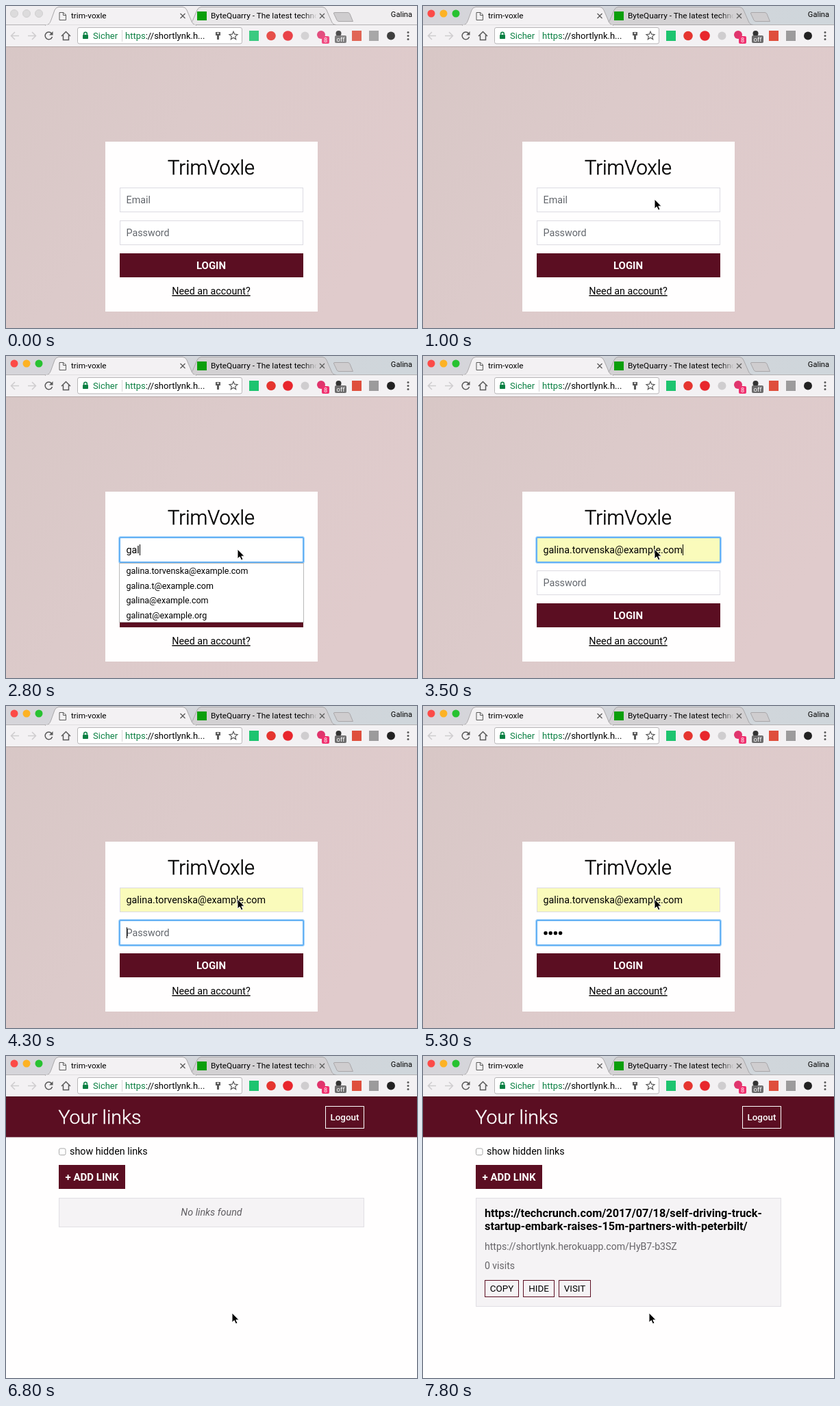
Animation, 600 px wide and 470 px high, one loop 8 s. Source, as an HTML page:

```html
<!DOCTYPE html>
<html lang="en">
<head>
<meta charset="utf-8">
<title>Login demo</title>
<style>
html, body { margin: 0; width: 100%; height: 100%; overflow: hidden; background: #fff; }
svg { display: block; width: 600px; height: 470px; font-family: Roboto, "Open Sans", sans-serif; font-size: 14.3px; fill: #000; }
.hide { display: none; }
.line { fill: none; stroke: #5a5a5a; stroke-width: 1.5; }
.tab { font-size: 11.8px; }
.url { font-size: 13px; }
.big { font-size: 28.4px; font-weight: 300; stroke-width: .45; }
.btn { font-size: 15px; font-weight: 700; fill: #fff; }
.small { font-size: 13.4px; }
.box { fill: #fff; stroke: #dcdbe2; }
.wine { fill: #5b0e22; }
.hint { fill: #62666c; }
.ring rect { fill: none; stroke: #66b2f4; stroke-width: 2; }
.ring rect:first-child { stroke: #a9d5fb; stroke-width: 3; }
.strip { fill: url(#bar); }
.back { fill: #d3d1d3; }
.fade { stop-color: #d3d1d3; }
.idle .strip { fill: #f0eef0; }
.idle .back { fill: #e9e7e9; }
.idle .fade { stop-color: #e9e7e9; }
.idle .light { fill: #dcdbdc; stroke: #d0cfd0; }
.idle .ext { opacity: .86; }
</style>
</head>
<body>
<svg id="stage" viewBox="0 0 600 470" xmlns="http://www.w3.org/2000/svg">
  <defs>
    <linearGradient id="wall" x1="0" y1="0" x2="1" y2="0.5">
      <stop offset="0" stop-color="#d8c7c6"/>
      <stop offset=".45" stop-color="#dccaca"/>
      <stop offset="1" stop-color="#e0cbcc"/>
    </linearGradient>
    <linearGradient id="bar">
      <stop offset="0" stop-color="#d6d5da"/>
      <stop offset="1" stop-color="#cfd6db"/>
    </linearGradient>
    <linearGradient id="fade">
      <stop class="fade" offset="0" stop-opacity="0"/>
      <stop class="fade" offset="1"/>
    </linearGradient>
    <clipPath id="tabClip"><rect x="296" y="4" width="157" height="22"/></clipPath>
  </defs>

  <!-- login page -->
  <g id="login">
    <rect y="59" width="600" height="411" fill="url(#wall)"/>
    <rect x="145" y="198" width="310" height="248" fill="#fffefe"/>
    <text class="big" x="299.5" y="246" text-anchor="middle" stroke="#000" style="font-size:29px">TrimVoxle</text>
    <rect id="mailBox" class="box" x="166.5" y="265.5" width="267" height="35"/>
    <text id="mail" x="175.5" y="288"></text>
    <rect class="box" x="166.5" y="313.5" width="267" height="35"/>
    <text id="passHint" class="hint" x="175.5" y="336">Password</text>
    <g id="dots"></g>
    <rect class="wine" x="166" y="361" width="268" height="35"/>
    <text class="btn" x="299.5" y="384" text-anchor="middle">LOGIN</text>
    <text x="299.5" y="421" text-anchor="middle" text-decoration="underline">Need an account?</text>
    <g id="ring" class="ring"><rect/><rect/></g>
    <rect id="caret" width="1" height="16"/>
    <g id="menu"></g>
  </g>

  <!-- links page -->
  <g id="links">
    <rect y="59" width="600" height="411" fill="#fffefe"/>
    <rect class="wine" y="59" width="600" height="59.500"/>
    <text class="big" x="76.5" y="99" fill="#fff" stroke="#fff">Your links</text>
    <rect x="466.5" y="73.5" width="56" height="32" fill="none" stroke="#fff"/>
    <text class="small" x="494.5" y="94" text-anchor="middle" font-weight="500" fill="#fff">Logout</text>
    <rect x="77.5" y="135" width="9.5" height="9.5" rx="2" fill="#fff" stroke="#a9a9a9"/>
    <text x="93" y="143.5">show hidden links</text>
    <rect class="wine" x="77" y="159" width="97" height="35"/>
    <text class="btn" x="125.5" y="182" text-anchor="middle">+ ADD LINK</text>
    <rect id="panel" x="77.5" y="207.5" width="445" height="42" fill="#f5f3f5" stroke="#e1dfe4"/>
    <text id="none" x="300" y="233" text-anchor="middle" font-style="italic" fill="#5f5d61">No links found</text>
    <g id="item">
      <g font-size="16.3" font-weight="700">
        <text x="90" y="235">https://techcrunch.com/2017/07/18/self-driving-truck-</text>
        <text x="90" y="254">startup-embark-raises-15m-partners-with-peterbilt/</text>
      </g>
      <text x="90" y="283" font-size="14.1" fill="#666468">https://shortlynk.herokuapp.com/HyB7-b3SZ</text>
      <text x="90" y="311" font-size="14" fill="#666468">0 visits</text>
      <g fill="none" stroke="#5b0e22">
        <rect x="90.5" y="327.5" width="49" height="24"/>
        <rect x="146.5" y="327.5" width="45" height="24"/>
        <rect x="198.5" y="327.5" width="46" height="24"/>
      </g>
      <g class="small" text-anchor="middle">
        <text x="115" y="344">COPY</text>
        <text x="169" y="344">HIDE</text>
        <text x="221.5" y="344">VISIT</text>
      </g>
    </g>
  </g>

  <!-- browser window -->
  <g id="chrome">
    <rect class="strip" width="600" height="28"/>
    <rect y="27" width="600" height="32" fill="#f3f1f3"/>
    <path d="M0 27.5H600" stroke="#b4b2b4"/>
    <path class="back" d="M266 27.5C270 27 271 24 273 20L279 6Q281 1.500 285 1.500H462Q466 1.500 468 6L475 22Q477 27.500 482 27.500Z" stroke="#a9a7a9"/>
    <path d="M57 28C63 27.500 64 25 66 20L71 6Q73 1.500 77 1.500H258Q262 1.500 264 6L270 20Q272 27.500 278 28Z" fill="#f3f1f3" stroke="#a9a7a9"/>
    <path d="M58 28.500H277" stroke="#f3f1f3" stroke-width="2"/>
    <path d="M480 9.500H499Q501 9.500 502 11.500L506.500 22.500H486Q484 22.500 483 20.500L478.500 11Q478 9.500 480 9.500Z" fill="#cfcdcf" stroke="#a9a7a9"/>
    <circle class="light" cx="12" cy="11" r="5.500" fill="#fc4b48"/>
    <circle class="light" cx="30" cy="11" r="5.500" fill="#fdb224"/>
    <circle class="light" cx="48" cy="11" r="5.500" fill="#28c231"/>
    <path class="line" d="M78 9.500H84L87.500 13V20.500H78ZM83.500 9.500V13.500H87.500" style="stroke-width:1"/>
    <text class="tab" x="95" y="18">trim-voxle</text>
    <path class="line" d="M254.500 11L261.500 18M261.500 11L254.500 18M458 11L465 18M465 11L458 18" style="stroke-width:1.300"/>
    <rect x="279" y="8" width="14" height="13" fill="#0a9e0a"/>
    <text class="tab" x="299" y="18" clip-path="url(#tabClip)">ByteQuarry - The latest technology</text>
    <rect x="434" y="5" width="20" height="20" fill="url(#fade)"/>
    <text x="593" y="16" font-size="11.100" text-anchor="end">Galina</text>

    <path class="line" d="M19 43.500H7.500M13 38L7.500 43.500L13 49M32 43.500H43.500M38 38L43.500 43.500L38 49" style="stroke:#cfcdcf"/>
    <path class="line" d="M66.500 40A5.300 5.300 0 1 0 67.500 45"/>
    <path d="M68.500 37V42.500H63Z" fill="#5a5a5a"/>
    <path class="line" d="M81 44L87.500 37.500L94 44M83.500 42.500V49.500H91.500V42.500"/>
    <rect x="104.500" y="31.500" width="240" height="23.500" rx="2.500" fill="#fff" stroke="#b7b5b7"/>
    <rect x="112" y="42" width="8" height="6" rx=".8" fill="#0b8043"/>
    <path class="line" d="M113.700 42V40.500A2.300 2.300 0 0 1 118.300 40.500V42" style="stroke:#0b8043"/>
    <text class="url" x="127" y="48" fill="#0b8043">Sicher</text>
    <path d="M169.500 35V52" stroke="#d5d5d5"/>
    <text class="url" x="174" y="48"><tspan fill="#0b8043">https</tspan>://shortlynk.h...</text>
    <path d="M306 38H313V43H311V49H308V43H306Z" fill="#5a5a5a"/>
    <rect x="308" y="39" width="3" height="1.500" fill="#fff"/>
    <path id="star" class="line" style="stroke-width:1.200"/>

    <g class="ext">
      <rect x="355" y="36" width="14" height="15" fill="#1dc46f"/>
      <circle cx="387" cy="43.500" r="6.800" fill="#e5352f"/>
      <circle cx="411.500" cy="43.500" r="7.300" fill="#e8262d"/>
      <circle cx="436.500" cy="43.500" r="6" fill="#cfcdcf"/>
      <circle cx="460" cy="42" r="6" fill="#e0356d"/>
      <rect x="461" y="44" width="11" height="11" rx="2" fill="#f0306f"/>
      <text x="466.500" y="53" font-size="9" text-anchor="middle" fill="#fff">8</text>
      <circle cx="485.500" cy="40" r="4" fill="#333"/>
      <rect x="480" y="43" width="17" height="11" rx="2" fill="#6c6b6c"/>
      <text x="488.500" y="52" font-size="9.500" text-anchor="middle" fill="#fff">off</text>
      <rect x="505" y="36" width="14" height="15" fill="#df4f3c"/>
      <rect x="530" y="36" width="14" height="15" fill="#9c9b9c"/>
      <circle cx="562" cy="43.500" r="6" fill="#222"/>
    </g>
    <g fill="#5a5a5a">
      <circle cx="587" cy="38.500" r="1.500"/><circle cx="587" cy="43.500" r="1.500"/><circle cx="587" cy="48.500" r="1.500"/>
    </g>
    <path d="M0 59.500H600" stroke="#000" stroke-opacity=".16"/>
  </g>

  <path id="arrow" d="M0 0V14L3.200 11L5.500 16L8 15L5.800 10.200H10Z" fill="#000" stroke="#fff" stroke-width="1"/>
</svg>
<script>
const LOOP = 8000;
const MAIL = "galina.torvenska@example.com";
const SUGGEST = [MAIL, "galina.t@example.com", "galina@example.com", "galinat@example.org", "gt.test@example.com", "guest@example.com"];
const ROW = 21.5;
const $ = id => document.getElementById(id);

// [time, value] steps; each value holds until the next step
const CURSOR = [[0, null], [300, [372, 404]], [500, [343, 293]], [800, [338, 282]],
  [5800, [334, 330]], [6000, [330, 371]], [6300, [330, 375]]];
const TYPED = [[0, 0], [2300, 1], [2500, 2], [2800, 3], [3300, MAIL.length]];
const ROWS = [[0, 0], [2300, 6], [2800, 4], [3300, 0]];
const DOTS = [[0, 0], [4500, 1], [4800, 3], [5000, 4], [5500, 6]];
const FOCUS = [[0, ""], [1300, "mail"], [3800, "pass"], [6300, "login"]];
const CARET = [[0, 0], [1300, 1], [1800, 0], [2300, 1], [5300, 0], [5500, 1], [5800, 0]];
const RINGS = { mail: [166, 265, 268, 36], pass: [166, 313, 268, 36], login: [165, 360, 270, 37] };

const at = (steps, t) => steps.reduce((v, s) => t >= s[0] ? s[1] : v, null);
const show = (id, on) => $(id).classList.toggle("hide", !on);
const put = (el, attrs) => { for (const k in attrs) el.setAttribute(k, attrs[k]); };

function add(parent, tag, attrs, text = "") {
  const el = document.createElementNS("http://www.w3.org/2000/svg", tag);
  put(el, attrs);
  el.textContent = text;
  return parent.appendChild(el);
}

function starPath(cx, cy, r) {
  const pts = Array.from({ length: 10 }, (_, i) => {
    const a = i * Math.PI / 5 - Math.PI / 2, q = i % 2 ? r * 0.45 : r;
    return `${(cx + q * Math.cos(a)).toFixed(1)} ${(cy + q * Math.sin(a)).toFixed(1)}`;
  });
  return `M${pts.join("L")}Z`;
}

$("star").setAttribute("d", starPath(332, 43.5, 6.3));
for (let i = 0; i < 6; i++) add($("dots"), "circle", { cx: 179 + 7.2 * i, cy: 331.5, r: 2.7 });
const frame = add($("menu"), "rect", { x: 165.5, y: 302.5, width: 269, fill: "#fff", stroke: "#b8b8b8" });
const hover = add($("menu"), "rect", { x: 166, y: 303, width: 268, height: ROW, fill: "#e3e3e5" });
const rows = SUGGEST.map((s, i) =>
  add($("menu"), "text", { x: 175.5, y: 318 + i * ROW, "font-size": 12.5 }, s));

function drawFields(t) {
  const typed = at(TYPED, t), dots = at(DOTS, t), focus = at(FOCUS, t), count = at(ROWS, t);
  const mail = $("mail");
  const text = typed ? MAIL.slice(0, typed) : "Email";
  if (mail.textContent !== text) mail.textContent = text;
  mail.classList.toggle("hint", !typed);
  $("mailBox").style.fill = typed === MAIL.length ? "#fafbbb" : "#fff";

  show("passHint", !dots);
  [...$("dots").children].forEach((d, i) => d.classList.toggle("hide", i >= dots));

  show("ring", focus);
  if (focus) {
    const [x, y, w, h] = RINGS[focus];
    const [glow, edge] = $("ring").children;
    put(glow, { x: x - .5, y: y - .5, width: w + 1, height: h + 1, rx: 2 });
    put(edge, { x, y, width: w, height: h, rx: 1 });
  }

  show("caret", at(CARET, t));
  const end = focus === "pass" ? 175.5 + 7.2 * dots : 175.5 + (typed ? mail.getComputedTextLength() : 0);
  put($("caret"), { x: Math.round(end), y: focus === "pass" ? 323 : 275 });

  show("menu", count);
  put(frame, { height: count * ROW });
  hover.classList.toggle("hide", t < 3000);
  rows.forEach((r, i) => r.classList.toggle("hide", i >= count));
}

function draw(t) {
  const inside = t >= 6800, loaded = t >= 7300;
  $("stage").classList.toggle("idle", t < 1000);
  show("login", !inside);
  show("links", inside);
  if (inside) {
    show("none", !loaded);
    show("item", loaded);
    put($("panel"), { height: loaded ? 158 : 42 });
  } else drawFields(t);

  const pos = at(CURSOR, t);
  show("arrow", pos);
  if (pos) put($("arrow"), { transform: `translate(${pos})` });
}

function tick() {
  draw(performance.now() % LOOP);
  requestAnimationFrame(tick);
}
tick();
</script>
</body>
</html>
```
